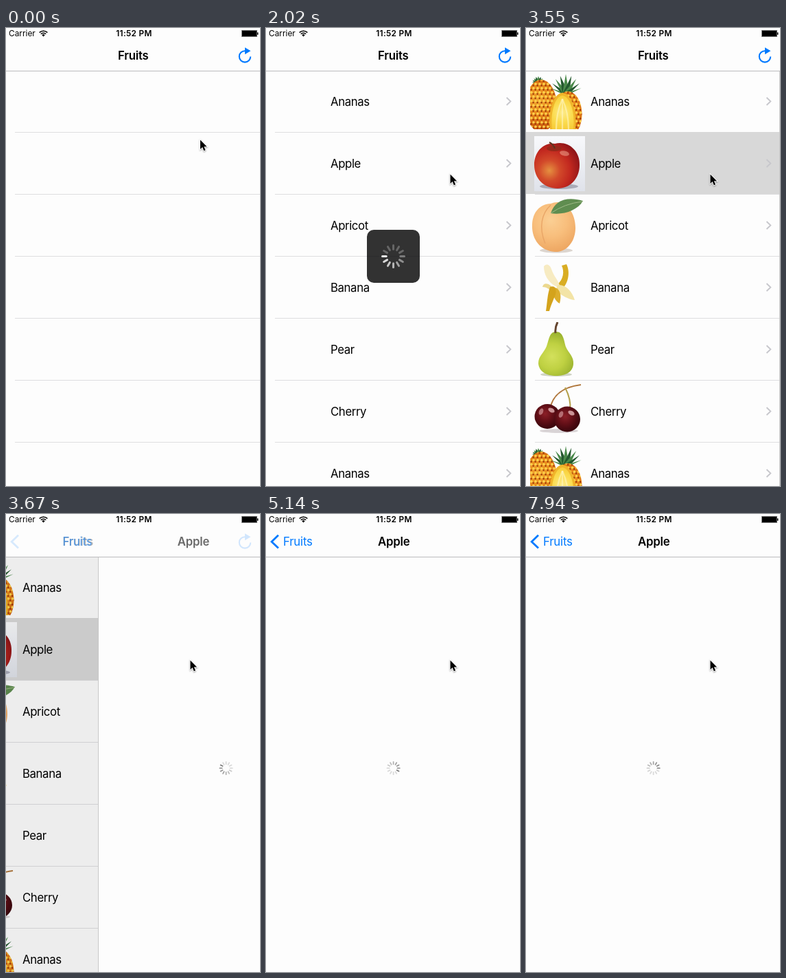
An HTML page with a canvas for the animation above (8 s loop, 370x665 px).

```html
<!DOCTYPE html>
<html lang="en">
<head>
<meta charset="utf-8">
<title>Fruits</title>
<style>
  html, body { margin: 0; width: 100%; height: 100%; overflow: hidden; background: #fdfdfd; }
  canvas { display: block; width: 370px; height: 665px; }
</style>
</head>
<body>
<canvas id="stage"></canvas>
<script>
const W = 370, H = 665, LOOP = 8000, TAU = Math.PI * 2;
const BLUE = '#007aff', PAPER = '#fdfdfd';
const ROW_H = 90, BAR_H = 62;
const canvas = document.getElementById('stage');
const dpr = window.devicePixelRatio || 1;
canvas.width = W * dpr;
canvas.height = H * dpr;
const c = canvas.getContext('2d');

const clamp = (v) => Math.min(1, Math.max(0, v));
const ramp = (t, a, b) => clamp((t - a) / (b - a));
const lerp = (a, b, k) => a + (b - a) * k;
const smooth = (k) => k * k * (3 - 2 * k);
const spring = (ms) => {
  const x = Math.max(0, ms) * 0.01782;
  return 1 - (1 + x) * Math.exp(-x);
};

function layer(alpha, draw) {
  if (alpha <= 0) return;
  c.save();
  c.globalAlpha *= alpha;
  draw();
  c.restore();
}

function text(str, x, y, { size = 16.8, weight = 400, color = '#000', spacing = -0.4, align = 'left' } = {}) {
  c.font = `${weight} ${size}px Inter, Roboto, sans-serif`;
  c.letterSpacing = spacing + 'px';
  c.textAlign = align;
  c.fillStyle = color;
  c.fillText(str, x, y);
}

function line(points, color, width) {
  c.beginPath();
  points.forEach(([x, y]) => c.lineTo(x, y));
  c.strokeStyle = color;
  c.lineWidth = width;
  c.stroke();
}

function shape(points, fill) {
  c.beginPath();
  points.forEach(([x, y]) => c.lineTo(x, y));
  c.closePath();
  c.fillStyle = fill;
  c.fill();
}

function oval(x, y, rx, ry, fill, turn = 0) {
  c.beginPath();
  c.ellipse(x, y, rx, ry, turn, 0, TAU);
  c.fillStyle = fill;
  c.fill();
}

function curve(path, fill, stroke, width) {
  const p = new Path2D(path);
  if (fill) { c.fillStyle = fill; c.fill(p); }
  if (stroke) { c.strokeStyle = stroke; c.lineWidth = width; c.stroke(p); }
}

function glow(x, y, r, ...colors) {
  const g = c.createRadialGradient(x, y, 0, x, y, r);
  colors.forEach((col, i) => g.addColorStop(i / (colors.length - 1), col));
  return g;
}

// Fruit thumbnails, each drawn in an 80 x 80 box
function leaves(x, y, r) {
  for (let i = -4; i <= 4; i++) {
    const a = i * 0.3, len = r * (1 - Math.abs(i) * 0.04);
    const tx = x + Math.sin(a) * len, ty = y - Math.cos(a) * len;
    shape([[x - 5, y], [tx, ty], [x + 5, y]], i % 2 ? '#24592f' : '#4a8a4a');
  }
}

function rind(x, y, rx, ry) {
  c.save();
  oval(x, y, rx, ry, glow(x - 4, y - 8, ry, '#f2a830', '#e88a1c', '#d0600f'));
  c.clip();
  for (let j = 0; j < 14; j++) {
    for (let i = 0; i < 8; i++) {
      const px = x - rx + i * 6 + (j % 2) * 3, py = y - ry + j * 6.2;
      oval(px, py, 1.8, 1.8, '#fbd34e');
      oval(px + 2.6, py + 2.2, 1.1, 1.3, '#9c3a0c');
    }
  }
  c.restore();
}

function ananas() {
  leaves(12, 15, 12);
  rind(16, 46, 23, 38);
  leaves(52, 29, 29);
  rind(55, 58, 20.5, 33);
  curve('M29 80C25 54 34 28 47 27C61 28 69 54 66 80Z', '#f0b52a');
  curve('M32 80C29 56 36 32 47 31C58 32 66 56 63 80Z',
    glow(47, 56, 28, '#fdeb8a', '#fbdc50', '#f6c934'));
  layer(0.6, () => {
    for (const dx of [-9, 0, 9]) {
      curve(`M47 36Q${47 + dx} 56 ${47 + dx} 80`, null, '#fff6c0', 2.2);
    }
  });
}

function apple() {
  const bg = c.createLinearGradient(0, 0, 0, 80);
  bg.addColorStop(0, '#f8f9fc');
  bg.addColorStop(0.5, '#eceef3');
  bg.addColorStop(1, '#dfe2ea');
  c.fillStyle = bg;
  c.fillRect(6, 0, 74, 80);
  oval(42, 73, 28, 4, '#a9abb8');
  curve('M36 11C54 6 73 20 72 42C72 62 58 76 40 76C21 76 6 62 6 42C6 22 20 9 36 11Z',
    glow(28, 50, 46, '#e59040', '#d2492a', '#c2281f', '#8f1518'));
  oval(35, 18, 11, 4, '#96291a');
  curve('M36 18Q34 12 28 9', null, '#5c3520', 2);
  layer(0.5, () => oval(50, 25, 7, 3.5, '#f6b29a', 0.2));
}

function apricot() {
  oval(38, 76, 24, 3.5, '#dcd5cf');
  curve('M30 8C50 -1 67 20 66 45C65 66 51 79 36 78C14 76 2 59 3 38C4 20 14 9 30 8Z',
    glow(30, 32, 48, '#fbcf94', '#f8be7c', '#eda560'));
  curve('M30 10C17 22 12 42 22 66', null, '#e9a566', 1.4);
  curve('M30 22C36 4 52 -3 77 4C69 18 48 25 30 22Z', '#5f8d50');
  curve('M30 22Q50 8 76 5', null, '#a0bb88', 1);
}

function banana() {
  curve('M39 36C49 28 50 16 46 8L53 6C60 20 54 40 40 47Z', '#d9ad24');
  curve('M39 39C25 32 20 20 20 9C24 4 29 7 31 13C34 23 41 29 43 37Z', '#f7ebc2');
  curve('M31 38C24 32 19 34 18 39C25 39 30 44 33 48Z', '#ecd98f');
  curve('M40 36C52 35 61 45 65 58C55 57 46 51 38 45Z', '#f3e4a6');
  curve('M37 40C44 43 46 51 43 63C36 60 33 50 33 44Z', '#dcae2c');
  curve('M29 39C36 36 39 41 37 50C33 60 30 66 28 74L23 74C25 62 25 50 29 39Z', '#d4a31c');
}

function pear() {
  oval(38, 76, 23, 3, '#cfd3c4');
  curve('M38 14C48 14 49 25 52 36C56 45 64 50 63 61C62 73 51 78 38 78C24 78 13 72 12 60C12 49 20 45 24 35C28 24 28 14 38 14Z',
    glow(32, 50, 38, '#d3e05c', '#bfd142', '#94ad2c'));
  curve('M37 16Q36 8 40 0', null, '#65452f', 3);
}

function cherry() {
  oval(42, 68, 28, 3, '#d9d4d6');
  curve('M29 36C32 20 42 5 74 1', null, '#b0773c', 2);
  curve('M58 37C60 25 55 13 51 5', null, '#b4a04a', 2);
  for (const [x, y, r] of [[25, 47, 18.5], [54, 51, 19]]) {
    oval(x, y, r, r * 0.97, glow(x - 3, y - 4, r + 2, '#8c2028', '#661018', '#3e070e'));
    layer(0.8, () => oval(x + 6, y - 9, 5, 3, '#e3b4b6', 0.5));
    layer(0.6, () => oval(x - 9, y - 7, 3, 5, '#e0a8ac', 0.4));
  }
}

const FRUITS = [
  ['Ananas', ananas], ['Apple', apple], ['Apricot', apricot], ['Banana', banana],
  ['Pear', pear], ['Cherry', cherry], ['Ananas', ananas],
];

function drawList(loaded, pictures, picked) {
  c.fillStyle = PAPER;
  c.fillRect(0, BAR_H, W, H);
  FRUITS.forEach(([name, picture], i) => {
    const top = BAR_H + i * ROW_H, mid = top + 44.5;
    if (i === picked) {
      c.fillStyle = '#d8d8d8';
      c.fillRect(0, top - 1, W, ROW_H);
    }
    c.fillStyle = '#dedee0';
    c.fillRect(13, top + 89, W, 1);
    if (!loaded) return;
    layer(pictures, () => {
      c.translate(6, top + 5);
      c.beginPath();
      c.rect(0, 0, 80, 80);
      c.clip();
      picture();
    });
    text(name, 94, mid + 6);
    line([[350.5, mid - 5.5], [356.3, mid], [350.5, mid + 5.5]], '#c7c7cc', 1.9);
  });
}

function spinner(x, y, inner, outer, width, color, head) {
  c.save();
  c.translate(x, y);
  c.lineCap = 'round';
  c.strokeStyle = color;
  c.lineWidth = width;
  const base = c.globalAlpha;
  for (let i = 0; i < 12; i++) {
    const age = (((head - i) % 12) + 12) % 12;
    const a = i * TAU / 12, sx = Math.sin(a), sy = -Math.cos(a);
    c.globalAlpha = base * Math.max(0.28, 1 - age * 0.1);
    c.beginPath();
    c.moveTo(sx * inner, sy * inner);
    c.lineTo(sx * outer, sy * outer);
    c.stroke();
  }
  c.restore();
}

function drawHud(t) {
  const alpha = t < 1900 ? ramp(t, 1090, 1230) : 1 - ramp(t, 2090, 2320);
  layer(alpha, () => {
    c.beginPath();
    c.roundRect(147, 293, 77, 77, 10);
    c.fillStyle = 'rgba(0,0,0,0.8)';
    c.fill();
    spinner(185.5, 331.5, 10.3, 16, 3, '#ececec', 9 + Math.floor((t - 2003) / 83.33));
  });
}

function refreshIcon() {
  c.beginPath();
  c.arc(348, 41.4, 8.2, 0, Math.PI * 1.5);
  c.strokeStyle = BLUE;
  c.lineWidth = 2.1;
  c.stroke();
  shape([[348, 28.2], [356.4, 33.2], [348, 38.2]], BLUE);
}

function drawStatus() {
  text('Carrier', 4, 12.4, { size: 11.85, spacing: 0 });
  text('11:52 PM', 186.5, 12.4, { size: 11.85, weight: 600, spacing: 0.3, align: 'center' });
  const a = -Math.PI * 0.75, b = -Math.PI * 0.25;
  for (const r of [8.2, 5.2]) {
    c.beginPath();
    c.arc(54.5, 12.4, r, a, b);
    c.strokeStyle = '#000';
    c.lineWidth = 1.6;
    c.stroke();
  }
  c.beginPath();
  c.moveTo(54.5, 12.6);
  c.arc(54.5, 12.4, 3.1, a, b);
  c.fillStyle = '#000';
  c.fill();
  c.strokeStyle = '#777';
  c.lineWidth = 1;
  c.strokeRect(343.5, 3.5, 22, 9);
  c.fillRect(344, 4, 21, 8);
  c.fillRect(366, 6.4, 1.4, 3.4);
}

function drawBar(t, q) {
  c.fillStyle = PAPER;
  c.fillRect(0, 0, W, BAR_H);
  c.fillStyle = '#bcbcbe';
  c.fillRect(0, BAR_H, W, 1);
  drawStatus();
  const x = lerp(163, 25, q), title = { weight: 600, spacing: -0.2 };
  layer((1 - q) ** 1.4, () => text('Fruits', x, 46, title));
  layer(q, () => {
    text('Fruits', x, 46, { color: BLUE, spacing: -0.2 });
    text('Apple', lerp(371, 163, q), 46, title);
  });
  layer(q ** 3.5, () => line([[18, 30.8], [8.2, 40.2], [18, 49.6]], BLUE, 2.8));
  const press = t < 1090 ? 1 : lerp(0.3, 1, ramp(t, 1090, 1260));
  layer((1 - q) ** 2 * press, refreshIcon);
}

function drawCursor(t) {
  const go = smooth(ramp(t, 40, 630)), back = smooth(ramp(t, 1260, 1850));
  c.save();
  c.translate(lerp(lerp(283, 345.6, go), 268.5, back), lerp(lerp(162.5, 39.5, go), 212.5, back));
  const arrow = new Path2D('M0 0V13.4L3.1 10.6L5.3 15.7L7.6 14.7L5.4 9.7H9.6Z');
  c.shadowColor = 'rgba(0,0,0,0.35)';
  c.shadowBlur = 2 * dpr;
  c.shadowOffsetY = dpr;
  c.strokeStyle = '#fff';
  c.lineWidth = 1.8;
  c.stroke(arrow);
  c.shadowColor = 'transparent';
  c.fillStyle = '#000';
  c.fill(arrow);
  c.restore();
}

function drawDetail(x) {
  c.fillStyle = '#c9c9c9';
  c.fillRect(x - 1, BAR_H, 1, H);
  c.fillStyle = PAPER;
  c.fillRect(x, BAR_H, W, H);
}

function render(t) {
  c.setTransform(dpr, 0, 0, dpr, 0, 0);
  c.fillStyle = PAPER;
  c.fillRect(0, 0, W, H);
  const pushing = t >= 3550;
  const p = pushing ? spring(t - 3550) : 0;
  const q = pushing ? spring(t - 3561) : 0;
  const x = Math.round(W * (1 - p));
  if (x > 0) {
    c.save();
    c.translate(-Math.round(W * 0.3 * p), 0);
    drawList(t >= 1910, t >= 2140 ? 1 : 0, pushing ? 1 : -1);
    c.restore();
    c.fillStyle = `rgba(0,0,0,${0.1 * p})`;
    c.fillRect(0, BAR_H, W, H);
  }
  if (pushing) {
    drawDetail(x);
    const head = 4 + Math.floor((t - 5100) / 80);
    spinner(x + 185.6, 369, 5.8, 9.2, 1.7, '#7c7c7c', head);
  }
  drawBar(t, q);
  drawHud(t);
  drawCursor(t);
}

const start = performance.now();
function tick() {
  render((performance.now() - start) % LOOP);
  requestAnimationFrame(tick);
}
tick();
</script>
</body>
</html>
```
